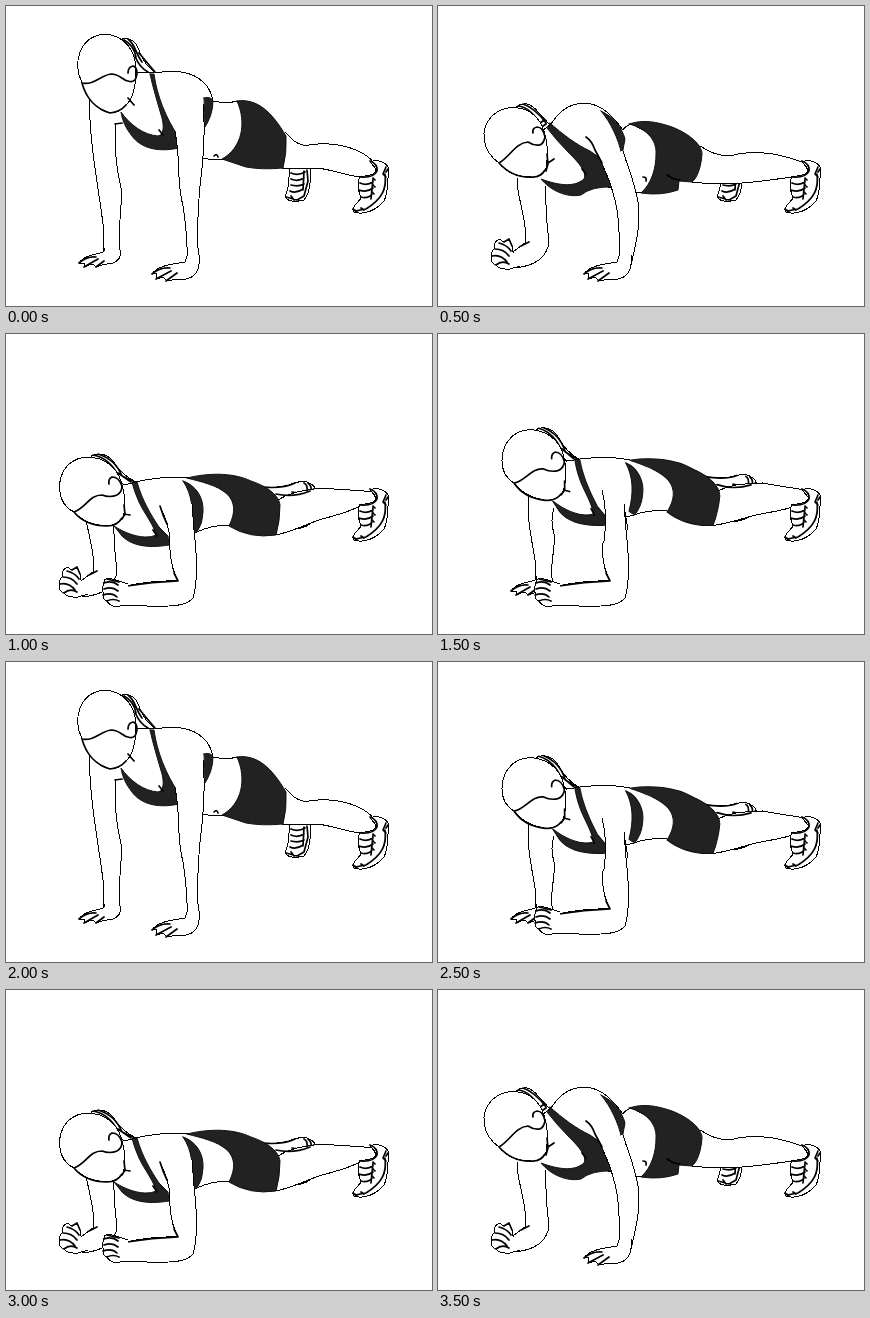
Recreate the animation shown at these times as an HTML page. Size 426x300 px, loop 4000 ms.

```html
<!DOCTYPE html>
<html lang="en">
<head>
<meta charset="utf-8">
<title>Up-down plank</title>
<style>
  html, body { margin: 0; width: 100%; height: 100%; overflow: hidden; background: #fff; }
  svg { display: block; width: 426px; height: 300px; }
  path { fill: #fff; stroke: #000; stroke-width: 1; stroke-linecap: round; stroke-linejoin: round; shape-rendering: crispEdges; }
  .line { fill: none; stroke-width: 1.7; shape-rendering: auto; }
  .dark { fill: #222; stroke: #111; shape-rendering: auto; }
</style>
</head>
<body>
<svg id="stage" viewBox="0 0 426 300"></svg>
<script>
const skin = d => `<path d="${d}"/>`;
const line = d => `<path class="line" d="${d}"/>`;
const dark = d => `<path class="dark" d="${d}"/>`;
const group = (transform, ...parts) => `<g transform="${transform}">${parts.join('')}</g>`;

const nearShoe =
  skin('M364 156C370 153 380 155 383 163C381 173 383 186 378 195C371 203 359 210 348 206C344 202 352 197 355 192C352 184 351 176 354 170Q367 171 371 164Z') +
  line('M364 155Q372 158 371 165Q368 172 354 171M354 177Q361 180 367 176M353 184Q361 187 367 182M355 191Q362 193 366 188M367 173L365 193M380 161L377 168L380 171M379 168C381 183 376 193 360 203L349 205M382 163L380 166M347 203L351 206M355 202L358 204') +
  line('M367 172L369 174M367 179L369 181M366 186L368 188');

const farShoe =
  skin('M284 162C282 173 284 182 279 190C280 196 291 196 298 194C304 187 305 175 304 163Z') +
  line('M285 167Q292 170 299 166M285 173Q292 176 298 172M285 179Q292 181 298 178M284 185Q290 188 297 183M298 165L297 184M301 164L302 175L298 190L291 194M280 191L291 194M285 190L288 194');

const rightHand =
  skin('M181 250L179 256C168 258 152 259 146 268L151 267L150 273L157 271L161 275L171 273C184 275 192 269 193 258L194 249') +
  line('M146 268Q154 261 164 262M150 273L165 265M160 275L171 267');

const leftHand =
  skin('M98 242Q99 247 94 247C85 249 77 251 73 257L79 257L78 261L86 258L91 261L98 258Q112 259 115 248L113 240') +
  line('M73 257Q81 250 90 251M78 261L92 253M90 261L98 255');

const straightLeftArm =
  skin('M84 94C82 128 92 178 97 218L98 245L114 244C111 225 117 198 115 182C111 166 108 142 110 117') +
  line('M109 118L116 117') + leftHand;

const bentLeftArm =
  skin('M79 170C78 190 89 212 88 236L75 246L77 262C96 260 109 252 111 236Q107 205 108 180') +
  line('M83 240L91 236');

const fist =
  skin('M75 246L74 240L71 233L66 236L61 233Q54 238 57 242Q52 246 54 251Q52 257 58 259Q62 264 72 263L82 260') +
  line('M61 237Q69 239 73 245M57 243Q66 243 71 250M54 250Q63 248 69 256M58 259Q64 254 71 258M66 236L71 233L74 240');

const highPlank =
  farShoe +
  skin('M279 126C287 135 294 141 303 139C322 136 338 139 350 144Q362 149 368 157L370 166Q365 172 354 171C337 169 325 163 310 162L276 162') +
  nearShoe + straightLeftArm +
  skin('M131 65L150 67C165 64 185 64 197 76C204 82 206 89 207 95Q220 98 232 95L250 110L240 156L218 153Q207 155 197 152') +
  line('M208 150Q211 147 212 151') +
  dark('M231 95C251 92 266 106 280 130Q281 147 277 162Q256 164 240 161L216 153C236 142 241 117 231 95Z') +
  dark('M198 92Q205 90 207 95Q207 110 197 124Q200 108 198 92Z') +
  dark('M144 68L148 68C151 90 160 112 172 130L173 142C150 147 134 141 126 130C118 120 116 112 115 106C124 119 138 129 152 130C158 129 158 120 156 112C152 98 147 82 144 68Z') +
  line('M153 124L157 129') +
  skin('M169 126C175 152 170 174 177 200Q182 232 181 255L193 259C191 235 191 210 194 180C197 157 200 130 197 98') +
  rightHand +
  skin('M116 33C127 31 132 40 134 47Q139 60 150 67L131 66Z') +
  line('M118 34C126 38 129 46 130 51M122 33C130 39 129 47 136 56M129 50Q133 61 142 66M133 47L149 66') +
  skin('M76 77C66 55 74 31 98 28C118 29 130 44 130 64Q130 88 121 98Q114 107 104 107C91 103 80 93 76 77Z') +
  line('M76 77C88 80 96 68 106 68C116 69 117 75 122 75Q128 77 130 72C132 66 131 61 127 60Q122 61 122 67M76 77C80 92 90 103 104 107Q114 106 120 99M122 92L128 99');

const onRightHand =
  farShoe +
  skin('M262 140C274 148 288 152 300 148C325 144 345 149 367 157L370 166Q365 172 354 171C325 175 290 181 254 176') +
  nearShoe + bentLeftArm + fist +
  skin('M111 121C119 108 129 97 147 97C165 98 176 112 185 124Q188 119 194 118L235 140L225 180L204 187L170 181') +
  line('M205 171Q209 171 208 175') +
  dark('M191 118C206 113 219 116 234 121C252 128 264 139 264 148C263 162 259 172 254 176L241 175L240 184Q223 190 203 187C214 177 218 162 218 148C219 133 207 122 191 118Z') +
  line('M229 169Q236 174 242 174') +
  dark('M163 105C176 111 184 122 187 133L184 149C180 132 173 117 163 105Z') +
  dark('M112 117C124 128 139 139 152 145L162 152L175 181Q154 180 143 189C128 192 112 184 103 173C119 179 136 182 146 173C149 166 141 157 131 147Q119 135 109 122Z') +
  line('M144 163L148 168') +
  skin('M161 151C166 163 172 174 175 187C183 212 181 239 181 255L193 259C198 237 203 220 200 196C197 177 190 162 185 145') +
  line('M148 131Q154 135 157 144L164 157') +
  rightHand +
  skin('M78 101C86 95 94 98 100 106L112 119L104 125Z') +
  line('M80 100Q93 101 104 121M85 98Q97 102 108 117M99 119L105 115M102 122L108 118') +
  skin('M61 157C44 145 41 123 54 110C68 97 91 99 102 116C109 129 111 145 108 162Q104 172 93 171C78 171 68 166 61 157Z') +
  line('M61 157C72 151 77 137 90 136Q96 140 102 139Q106 137 107 131Q105 121 99 121Q94 122 95 127M61 157C70 167 82 172 95 171Q103 171 107 164M109 148L110 158L108 165M110 157L116 153');

const lowBody =
  skin('M252 153C268 154 280 153 288 149L297 147Q307 149 309 154L304 160L285 161') +
  line('M256 153Q277 155 289 149M298 149Q302 151 301 157M302 149Q306 152 305 157M286 158L298 160L308 155') +
  skin('M284 194Q293 197 304 190L306 185') +
  skin('M272 166C284 158 295 157 315 154C335 156 355 156 367 158L370 166Q365 172 354 172C339 180 325 182 310 187C295 193 284 198 270 201') +
  line('M270 160Q287 164 304 157') +
  skin('M129 148C148 144 168 142 182 144L190 145L245 160L240 191L224 191Q205 191 191 198L164 207') +
  dark('M181 144C201 139 226 138 245 147C263 153 273 162 274 171Q274 187 270 201Q244 205 223 192C230 178 229 168 221 160C211 151 196 148 181 144Z') +
  dark('M177 147C190 151 198 164 197 178Q197 189 191 198L185 195C188 177 186 160 177 147Z') +
  dark('M126 148L131 148C136 166 145 181 153 193L162 202L163 211C145 214 127 213 116 202L108 192C122 201 139 206 150 201C148 191 138 179 133 168Q128 157 126 148Z') +
  line('M147 196L151 202') +
  skin('M85 122C95 117 104 122 109 130Q116 141 130 148L118 151Z') +
  line('M87 121Q104 124 113 143M92 120Q109 125 116 142L129 148M112 139L125 148') +
  skin('M68 178C51 170 49 145 62 131C76 118 99 122 110 137C118 149 121 170 117 183Q111 192 100 192C86 191 76 187 68 178Z') +
  line('M68 178C80 174 83 161 96 161Q104 164 111 161Q116 158 116 152Q113 143 106 143Q102 145 103 150M68 178C77 189 88 192 101 192Q111 192 116 184M118 171L119 180L116 185M118 180L124 181');

const rightFist =
  skin('M122 250L113 247L106 245Q97 243 98 250Q95 255 98 260Q95 265 101 267Q105 274 114 272L124 271') +
  line('M98 249Q106 246 112 251M98 255Q106 252 112 257M97 261Q106 258 111 263M101 267Q107 264 113 267M101 245L113 248');

const rightForearm = shoulder =>
  skin(shoulder + 'C164 207 162 228 172 247Q148 246 120 252L119 272C151 271 177 276 187 264C192 249 191 219 188 196L186 170') +
  line('M168 239L172 247Q146 248 121 252') + rightFist;

const onForearms =
  group('translate(0 1)', bentLeftArm) + fist + lowBody + nearShoe +
  rightForearm('M154 173Q163 189 164 207') + line('M154 172Q157 182 161 190');

const onLeftHand =
  skin('M91 160C88 182 94 207 97 226L98 245L114 244C112 228 118 212 116 200Q112 186 116 174') +
  leftHand + group('translate(8 0) rotate(5.5 368 165)', lowBody) + nearShoe +
  rightForearm('M164 156Q170 180 166 207') +
  skin('M186 172L190 196');

const sequence = [highPlank, onRightHand, onForearms, onLeftHand, highPlank, onLeftHand, onForearms, onRightHand];
const stage = document.getElementById('stage');
let shown = -1;

function draw() {
  const step = Math.floor(performance.now() / 500) % sequence.length;
  if (step !== shown) {
    shown = step;
    stage.innerHTML = sequence[step];
  }
  requestAnimationFrame(draw);
}
draw();
</script>
</body>
</html>
```
